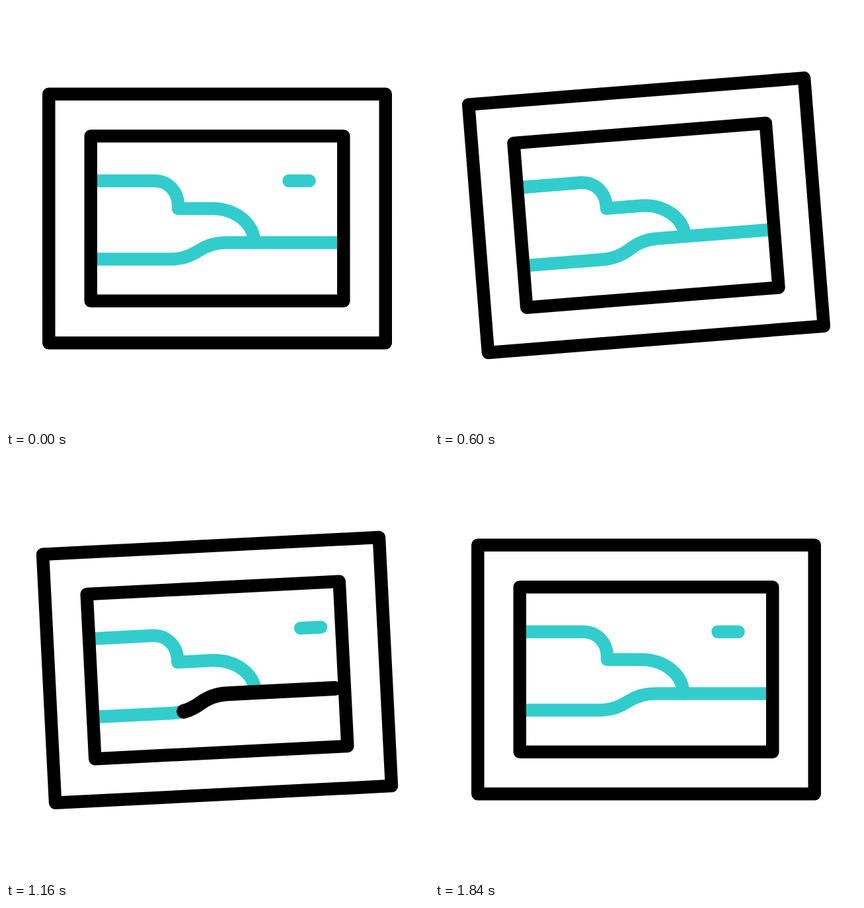
Animation of 640x640 px, one loop 2.16 s. Source, as an HTML page:

```html
<!DOCTYPE html>
<html lang="en">
<head>
<meta charset="utf-8">
<title>Swinging picture</title>
<style>
  @property --head { syntax: "<length>"; inherits: false; initial-value: 0px; }
  @property --tail { syntax: "<length>"; inherits: false; initial-value: 0px; }

  :root {
    --loop: 2160ms;
    --smooth: cubic-bezier(.333, 0, .667, 1);
    --speed-up: cubic-bezier(.333, 0, .667, .333);
    --slow-down: cubic-bezier(.333, .667, .667, 1);
  }
  html, body { margin: 0; width: 100%; height: 100%; overflow: hidden; background: #fff; }
  svg { display: block; width: 100vw; height: 100vh; }

  path, rect { fill: none; stroke-width: 19.5; stroke-linecap: round; stroke-linejoin: round; }
  .scene { stroke: #3cc; }
  .frame { stroke: #000; }

  .picture {
    transform-origin: 319.5px 321.5px;
    animation: swing var(--loop) var(--smooth) infinite, bob var(--loop) var(--smooth) infinite;
  }
  .sun { animation: drift var(--loop) linear infinite; }
  .ink {
    stroke: #000;
    stroke-width: 22;
    stroke-dasharray: calc(var(--head) - var(--tail)) 200px;
    stroke-dashoffset: calc(var(--tail) * -1);
    animation:
      head var(--loop) var(--smooth) infinite,
      tail var(--loop) var(--smooth) infinite,
      show var(--loop) step-end infinite;
  }

  @keyframes swing {
    0% { rotate: 0deg; }
    12.963% { rotate: 5deg; }
    25.926% { rotate: -5deg; }
    38.889% { rotate: 3deg; }
    51.852% { rotate: -3deg; }
    68.75%, 100% { rotate: 0deg; }
  }
  @keyframes bob {
    0%, 6.8% { translate: 0 0; }
    19.6% { translate: 0 13.6px; }
    33% { translate: 0 -14px; }
    46.7% { translate: 0 7px; }
    61.8% { translate: 0 -6.4px; }
    76.8%, 100% { translate: 0 0; }
  }
  @keyframes drift {
    0% { translate: 0 0; }
    11.02% { translate: 0 0; animation-timing-function: var(--speed-up); }
    36.06% { translate: -330px 0; animation-timing-function: step-end; }
    48.06% { translate: 83px 0; animation-timing-function: var(--slow-down); }
    60.6%, 100% { translate: 0 0; }
  }
  @keyframes head {
    0%, 31.7% { --head: 0px; }
    67.7%, 100% { --head: 100px; }
  }
  @keyframes tail {
    0%, 51.2% { --tail: 0px; }
    83.9%, 100% { --tail: 100px; }
  }
  @keyframes show {
    0% { visibility: hidden; }
    32% { visibility: visible; }
    84.6%, 100% { visibility: hidden; }
  }
</style>
</head>
<body>
<svg viewBox="0 0 640 640">
  <clipPath id="window"><rect x="128" y="196.5" width="383" height="250"/></clipPath>
  <g class="picture">
    <g class="scene" clip-path="url(#window)">
      <path d="M128 264.5H225C245 264.5 260.5 281 260.5 301V306.5H312C347 306.5 375.5 329 375.5 358"/>
      <path d="M128 383H250C268 383 281 377 291 370.5C304 362 316 358 332 358H511"/>
      <path class="sun" d="M428 264.5H459"/>
    </g>
    <path class="ink" pathLength="100" d="M502 358H332C316 358 304 362 291 370.5C281 377 268 383 250 383H145"/>
    <g class="frame">
      <rect x="64.75" y="133.25" width="509.5" height="376.5"/>
      <rect x="128.25" y="196.75" width="382.5" height="249.5"/>
    </g>
  </g>
</svg>
</body>
</html>
```
